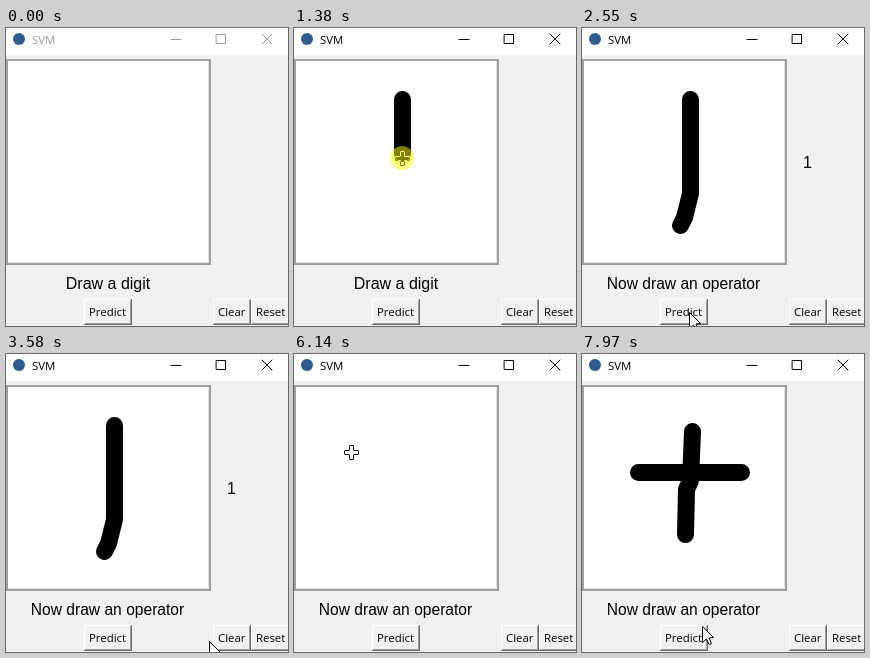
Animation, 282 px wide and 298 px high, one loop 8 s. Source, as an HTML page with a canvas:

```html
<!DOCTYPE html>
<html lang="en">
<head>
<meta charset="utf-8">
<style>
html, body { margin: 0; height: 100%; overflow: hidden; background: #f0f0f0; }
canvas { display: block; }
</style>
</head>
<body>
<canvas id="stage" width="282" height="298"></canvas>
<script>
const ctx = document.getElementById('stage').getContext('2d');
const LOOP = 8000;
const UI = '11.4px "Open Sans", "Noto Sans", sans-serif';
const LABEL = 'px "Liberation Sans", Arial, sans-serif';

// Pointer path: time, x, y, button held until the next key
const keys = [
  [280, 168, 256], [1020, 108, 71],
  [1250, 108, 71, 1], [1380, 108, 130, 1], [1490, 108, 165, 1],
  [1620, 102, 189, 1], [1690, 98, 197], [1760, 98, 199],
  [2030, 105, 253], [2250, 107, 284], [2330, 107, 284, 1], [2480, 107, 284],
  [3220, 107, 284], [3580, 203, 287], [3810, 219, 285],
  [4090, 219, 285, 1], [4310, 219, 285], [4890, 65, 88], [5110, 59, 75],
  [5890, 59, 76], [6360, 56, 118],
  [6510, 56, 118, 1], [6760, 159, 118], [6830, 159, 118],
  [6890, 151, 114], [7110, 110, 77],
  [7250, 110, 77, 1], [7400, 108, 126, 1], [7450, 104, 135, 1],
  [7600, 103, 180], [7680, 103, 181], [7970, 120, 272]
];

const inCanvas = (x, y) => x < 203 && y > 33 && y < 235;

function pointer(t) {
  let i = keys.length - 1;
  while (keys[i][0] > t) i--;
  const a = keys[i], b = keys[i + 1] || a;
  const k = b === a ? 0 : (t - a[0]) / (b[0] - a[0]);
  return { x: a[1] + (b[1] - a[1]) * k, y: a[2] + (b[2] - a[2]) * k, down: !!a[3] };
}

function rect(x, y, w, h, color) {
  ctx.fillStyle = color;
  ctx.fillRect(x, y, w, h);
}

function text(s, x, y, font, color = '#000', align = 'left') {
  ctx.font = font;
  ctx.fillStyle = color;
  ctx.textAlign = align;
  ctx.fillText(s, x, y);
}

function disc(x, y, r, color) {
  ctx.fillStyle = color;
  ctx.beginPath();
  ctx.arc(x, y, r, 0, Math.PI * 2);
  ctx.fill();
}

function titleBar(active) {
  const color = active ? '#000' : '#999';
  rect(0, 0, 282, 27, '#fff');
  disc(13, 11, 6, '#2f5a8c');
  text('SVM', 26, 16, UI, color);
  ctx.strokeStyle = color;
  ctx.lineWidth = 1;
  ctx.beginPath();
  ctx.moveTo(165, 11.5);
  ctx.lineTo(175, 11.5);
  ctx.rect(210.5, 6.5, 9, 9);
  ctx.moveTo(256, 6);
  ctx.lineTo(266, 16);
  ctx.moveTo(266, 6);
  ctx.lineTo(256, 16);
  ctx.stroke();
}

function drawArea() {
  rect(0, 31, 205, 206, '#a0a0a0');
  rect(2, 33, 201, 202, '#e3e3e3');
  rect(2, 33, 200, 201, '#fff');
}

function button(label, x, w, pressed) {
  const y = 271, h = 26, d = pressed ? 1 : 0;
  rect(x, y, w, h, pressed ? '#fff' : '#696969');
  rect(x, y, w - 1, h - 1, pressed ? '#696969' : '#fff');
  rect(x + 1, y + 1, w - 2, h - 2, pressed ? '#e3e3e3' : '#a0a0a0');
  rect(x + 1 + d, y + 1 + d, w - 3, h - 3, '#f0f0f0');
  text(label, x + 5 + d, 288 + d, UI);
}

// Ink follows the pointer wherever the button is held inside the area
function ink(from, t) {
  ctx.strokeStyle = '#000';
  ctx.lineWidth = 17;
  ctx.lineCap = ctx.lineJoin = 'round';
  ctx.beginPath();
  keys.forEach(([time, x, y, down], i) => {
    if (!down || time < from || time > t || !inCanvas(x, y)) return;
    const next = keys[i + 1];
    const end = t < next[0] ? pointer(t) : { x: next[1], y: next[2] };
    if (!keys[i - 1][3]) ctx.moveTo(x + .5, y + .5);
    ctx.lineTo(end.x + .5, end.y + .5);
  });
  ctx.stroke();
}

// Half outline of a pointer shape centred on the hotspot
function plus(a, b) {
  ctx.beginPath();
  for (let i = 0; i < 4; i++) {
    ctx.lineTo(-a, -b);
    ctx.lineTo(a, -b);
    ctx.lineTo(a, -a);
    ctx.rotate(Math.PI / 2);
  }
  ctx.closePath();
}

function cursor({ x, y, down }) {
  x = Math.round(x);
  y = Math.round(y);
  ctx.save();
  ctx.translate(x + .5, y + .5);
  ctx.lineWidth = 1;
  ctx.lineCap = 'butt';
  ctx.lineJoin = 'miter';
  if (inCanvas(x, y)) {
    plus(2, 7);
    ctx.globalCompositeOperation = 'difference';
    ctx.strokeStyle = '#fff';
    ctx.stroke();
  } else {
    const arrow = new Path2D('M0 0V16L4 12.5 6.5 18 9 17 6.5 11.5 11 11Z');
    ctx.fillStyle = '#fff';
    ctx.strokeStyle = '#000';
    ctx.fill(arrow);
    ctx.stroke(arrow);
  }
  ctx.restore();
  if (down) disc(x, y, 12, 'rgba(255,255,0,.5)');
}

function draw(t) {
  const predicted = t >= 2480, cleared = t >= 4310;
  rect(0, 0, 282, 298, '#f0f0f0');
  titleBar(t >= 1250);
  drawArea();
  ink(cleared ? 4310 : 0, t - 12);
  if (predicted) text('Now draw an operator', 101.5, 261, 15.6 + LABEL, '#000', 'center');
  else text('Draw a digit', 102, 261, 16 + LABEL, '#000', 'center');
  if (predicted && !cleared) text('1', 225.5, 140, 16 + LABEL, '#000', 'center');
  button('Predict', 78, 48, t >= 2330 && t < 2480);
  button('Clear', 207, 38, t >= 4090 && t < 4310);
  button('Reset', 245, 39, false);
  if (t >= 280) cursor(pointer(t));
}

const start = performance.now();
function tick() {
  draw((performance.now() - start) % LOOP);
  requestAnimationFrame(tick);
}
tick();
</script>
</body>
</html>
```
